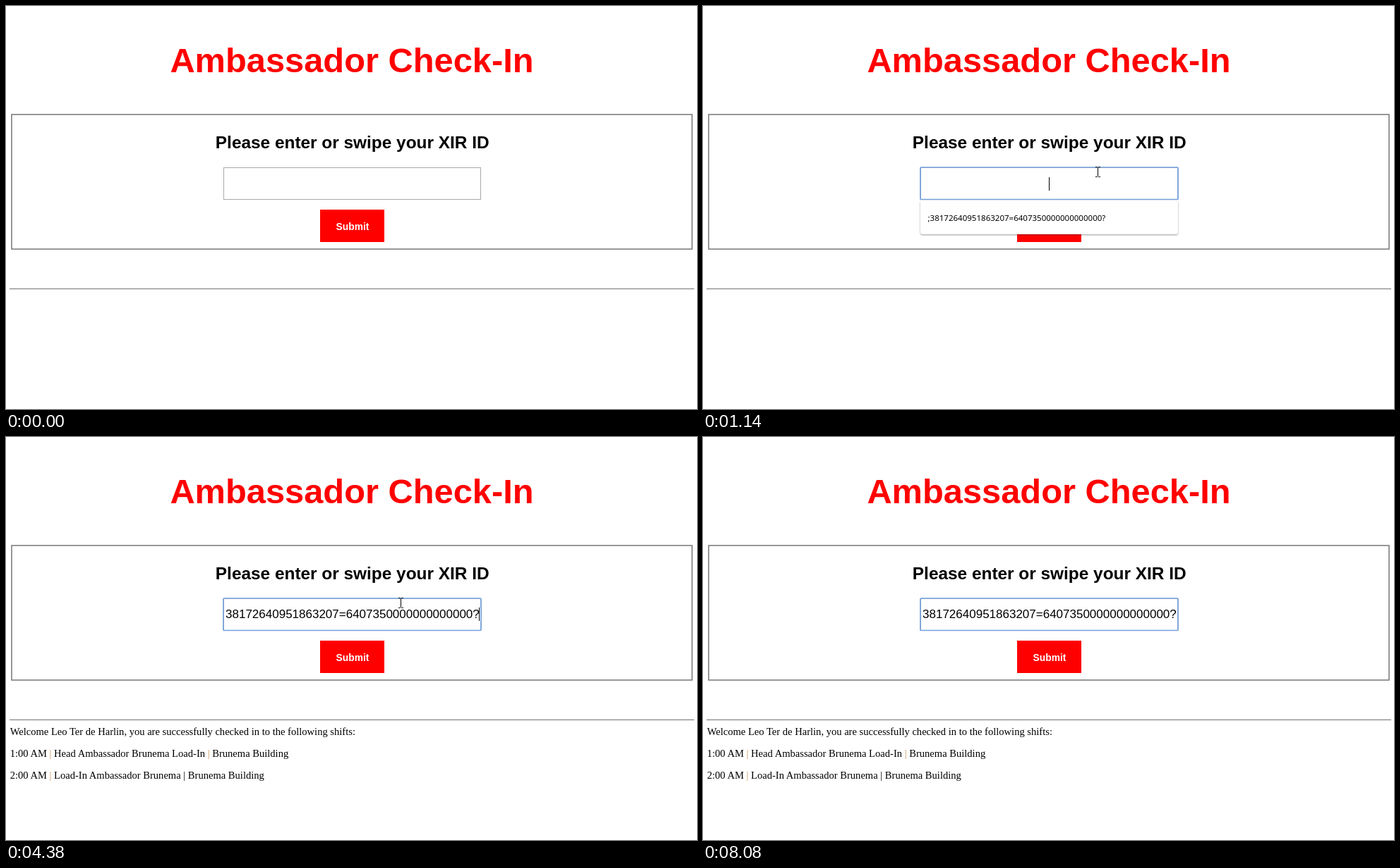
An HTML page for the animation above (8.31 s loop, 979x572 px).

```html
<!DOCTYPE html>
<html lang="en">
<head>
<meta charset="utf-8">
<title>Check-In</title>
<style>
  html, body { margin: 0; width: 100%; height: 100%; overflow: hidden; background: #fff; }
  svg { display: block; width: 979px; height: 572px; }
  text { font-family: "Liberation Sans", Arial, sans-serif; white-space: pre; }
  .bold { font-weight: bold; text-anchor: middle; }
  #message text { font: 14.57px "Liberation Serif", "Times New Roman", serif; }
  #message tspan { fill: #c88f50; }
  #dropdown rect { filter: drop-shadow(0 1px 1px rgba(0, 0, 0, .4)); }
  #dropdown text { font: 11.53px "Noto Sans", "Open Sans", sans-serif; }
</style>
</head>
<body>
<svg viewBox="0 0 979 572">
  <clipPath id="fieldClip"><rect x="310" y="230" width="361" height="44"/></clipPath>

  <text class="bold" x="490" y="94" font-size="48.8" fill="#f00">Ambassador Check-In</text>
  <rect x="8" y="154" width="964" height="191" fill="none" stroke="#777" stroke-width="1.5"/>
  <text class="bold" x="490.7" y="202" font-size="24.4">Please enter or swipe your XIR ID</text>
  <rect x="445" y="289" width="91" height="46" fill="#f00"/>
  <text class="bold" x="491" y="318" font-size="13.8" fill="#fff">Submit</text>
  <rect x="5" y="400.6" width="970" height="1.6" fill="#999"/>

  <rect x="308.5" y="229.5" width="364" height="45" fill="#fff" stroke="#a9a9a9"/>
  <rect id="focus" x="308" y="229" width="365" height="45.5" rx="1" fill="none" stroke="#74a0dc" stroke-width="1.7"/>
  <text id="typed" y="257" font-size="17" text-anchor="end" clip-path="url(#fieldClip)"></text>
  <rect id="caret" width="1" height="19"/>

  <g id="dropdown">
    <rect x="308" y="276" width="365" height="48" rx="3" fill="#fff"/>
    <text id="suggestion" x="318.5" y="304.5"></text>
  </g>

  <g id="message">
    <text x="5.7" y="423">Welcome Leo Ter de Harlin, you are successfully checked in to the following shifts:</text>
    <text x="5.7" y="454">1:00 AM <tspan>|</tspan> Head Ambassador Brunema Load-In <tspan>|</tspan> Brunema Building</text>
    <text x="5.7" y="485">2:00 AM <tspan>|</tspan> Load-In Ambassador Brunema | Brunema Building</text>
  </g>

  <circle id="click" cx="557" cy="234.5" r="11" fill="#ff0" opacity=".5"/>
  <g id="pointer">
    <path id="arrow" d="M0 0V16.5L4 13 6.5 18.5 9 17.5 6.5 12H11.5Z" fill="#fff" stroke="#000"/>
    <path id="beam" d="M-3 -6.5H-.5L.5 -5.5 1.5 -6.5H4M.5 -5.5V6.5M-3 7.5H-.5L.5 6.5 1.5 7.5H4" fill="none" stroke="#000"/>
  </g>
</svg>
<script>
const LOOP = 8310;
const CARD = ';38172640951863207=6407350000000000000?';
const TYPING = [[3120, 6], [3180, 12], [3250, 18], [3320, 24], [3370, CARD.length]];
const CARET_TOGGLES = [1040, 1540, 2050, 2560, 3120, 3870, 4380, 4890, 5450, 5960, 6480, 6990, 7570, 8080];
const FIELD_CENTER = 490.5;
const FIELD_END = 670.8;
const REST = [559, 235];
const ENTER = [[820, 528], [600, 380], [420, 250], REST];
const LEAVE = [REST, [620, 150], [800, 380], [882, 565]];

const $ = id => document.getElementById(id);
const show = (id, visible) => $(id).setAttribute('display', visible ? 'inline' : 'none');

function bezier([a, b, c, d], p) {
  const q = 1 - p;
  return [0, 1].map(k => q * q * q * a[k] + 3 * q * q * p * b[k] + 3 * q * p * p * c[k] + p * p * p * d[k]);
}

// Index of the current step in a movement that advances in even, discrete steps.
const stepAt = (t, start, end, steps) => Math.floor((t - start) / (end - start) * (steps - 1) + 1e-6);

function pointerAt(t) {
  if (t < 130) return null;
  if (t < 930) return bezier(ENTER, 1 - (1 - stepAt(t, 130, 930, 18) / 17) ** 1.6);
  if (t < 6670) return REST;
  if (t < 7330) return bezier(LEAVE, ((stepAt(t, 6670, 7330, 15) + 1) / 15) ** 1.3);
  return null;
}

function drawPointer(t) {
  const point = pointerAt(t);
  show('pointer', point);
  if (!point) return;
  const [x, y] = point.map(Math.round);
  const overField = x >= 308 && x <= 672 && y >= 229 && y <= 274;
  show('beam', overField);
  show('arrow', !overField);
  $('pointer').setAttribute('transform', `translate(${x} ${y})`);
}

function drawField(t) {
  const count = TYPING.reduce((n, [time, chars]) => t >= time ? chars : n, 0);
  const typed = $('typed');
  typed.textContent = CARD.slice(0, count);
  const width = count ? typed.getComputedTextLength() : 0;
  const end = Math.min(FIELD_CENTER + width / 2, FIELD_END);
  typed.setAttribute('x', end);
  $('caret').setAttribute('x', Math.floor(end));
  $('caret').setAttribute('y', count ? 242 : 243);
  show('caret', CARET_TOGGLES.filter(time => time <= t).length % 2);
}

function draw(now) {
  const t = now % LOOP;
  show('focus', t >= 1040);
  show('dropdown', t >= 1040 && t < 3120);
  show('click', t >= 980 && t < 1140);
  show('message', t >= 3370);
  drawField(t);
  drawPointer(t);
  requestAnimationFrame(draw);
}

$('suggestion').textContent = CARD;
draw(0);
</script>
</body>
</html>
```
